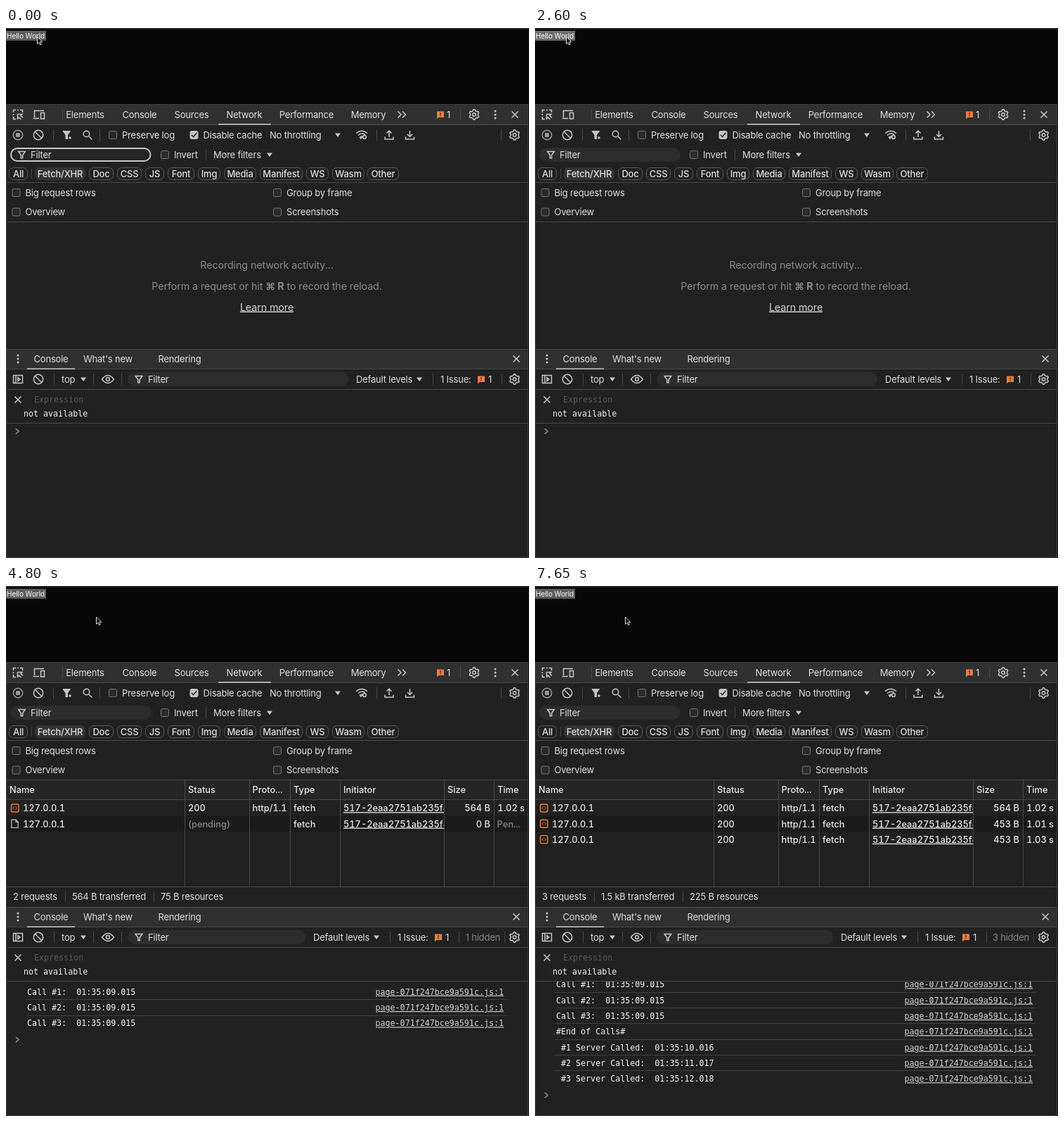
Animation, 744 px wide and 753 px high, one loop 7.7 s. Source, as an HTML page:

```html
<!DOCTYPE html>
<html lang="en">
<head>
<meta charset="utf-8">
<title>Network panel</title>
<style>
html, body { margin: 0; width: 100%; height: 100%; overflow: hidden; background: #212121; }
svg { display: block; }
text { font: 13px Inter, "Open Sans", sans-serif; letter-spacing: -.2px; fill: #dedede; white-space: pre; }
text.mono { font: 11.66px "DejaVu Sans Mono", monospace; letter-spacing: 0; fill: #f2f2f2; }
text.big { font-size: 14.3px; letter-spacing: -.1px; fill: #8b8b8b; }
text.bright { fill: #d6d6d6; }
text.pill { font-weight: 500; }
text.cell { font-size: 12.8px; font-weight: 450; letter-spacing: 0; font-feature-settings: "tnum"; fill: #e6e6e6; }
text.page { font-size: 10px; letter-spacing: -.05px; fill: #fff; }
.link { text-decoration: underline 1px; text-underline-offset: 2px; }
text.mono.link { fill: #cfcfcf; }
text.dim { fill: #858585; }
text.faint { fill: #5a5a5a; }
.icon { fill: none; stroke: #c8c8c8; stroke-width: 1.5; }
.solid { fill: #c8c8c8; stroke: none; }
</style>
</head>
<body>
<svg id="stage" width="744" height="753" viewBox="0 0 744 753"></svg>
<script>
const LOOP = 7700;
const RULE = '#484848';

// Text is placed by the middle of its capitals.
const text = (x, y, s, cls = '', anchor = 'start') => {
  const drop = cls.includes('page') ? 3.6 : cls.includes('mono') ? 4.2 : cls.includes('big') ? 5.1 : 4.7;
  return `<text x="${x}" y="${y + drop}" class="${cls}" text-anchor="${anchor}">${s}</text>`;
};
const rect = (x, y, w, h, fill, r = 0, extra = '') =>
  `<rect x="${x}" y="${y}" width="${w}" height="${h}" rx="${r}" fill="${fill}" ${extra}/>`;
const hline = (y, x = 0, w = 743, c = RULE) => rect(x, y, w, 1, c);
const vline = (x, y, h = 16, c = RULE) => rect(x, y - h / 2, 1, h, c);
const icon = (x, y, d, extra = '') => `<path class="icon" transform="translate(${x} ${y})" d="${d}" ${extra}/>`;
const circle = (x, y, r, extra = '') => `<circle class="icon" cx="${x}" cy="${y}" r="${r}" ${extra}/>`;

const cross = (x, y) => icon(x, y, 'M-4.5-4.5L4.5 4.5M4.5-4.5L-4.5 4.5');
const caretDown = (x, y) => `<path class="solid" d="M${x - 4} ${y - 2.5}h8l-4 5.5z"/>`;
const funnel = (x, y) => icon(x, y, 'M-4.8-4.5H4.8L1.2 .5V4.8H-1.2V.5Z', 'stroke-width="1.2"');
const clear = (x, y) => circle(x, y, 6.7) + icon(x, y, 'M-4.7-4.7L4.7 4.7');
const gear = (x, y) => {
  // Six teeth: two outer points, then two inner ones.
  const points = Array.from({ length: 24 }, (_, i) => {
    const r = i % 4 < 2 ? 7.2 : 5.5, a = (i - .5) * Math.PI / 12 - Math.PI / 2;
    return `${(x + r * Math.cos(a)).toFixed(2)},${(y + r * Math.sin(a)).toFixed(2)}`;
  });
  return `<polygon class="icon" points="${points.join(' ')}" stroke-linejoin="round"/>` + circle(x, y, 2.3);
};
const dots = (x, y) => [-5, 0, 5].map(d => circle(x, y + d, 1.5, 'style="fill:#c8c8c8;stroke:none"')).join('');
const issue = (x, y) => `<path fill="#ee7c45" d="M${x} ${y - 4.5}h10v8.5h-7.5l-2.5 2.5z"/>` +
  rect(x + 4.4, y - 3, 1.3, 3.6, '#3a2a20') + rect(x + 4.4, y + 1.4, 1.3, 1.3, '#3a2a20');
const box = (x, y, on) => rect(x - 5.5, y - 5.5, 11, 11, on ? '#c4c4c4' : '#2b2b2b', 2, `stroke="${on ? '#c4c4c4' : '#777'}"`) +
  (on ? icon(x, y, 'M-3.5 0L-1 2.7L3.7-3', 'style="stroke:#222"') : '');
const check = (x, y, label, on) => box(x, y, on) + text(x + 13, y, label);

function pageAndTabs() {
  return rect(0, 0, 744, 108, '#080808') + rect(0, 0, 744, 1.5, '#303030') +
    rect(0, 108, 744, 29, '#303030') + hline(108, 0, 743, '#3d3d3d') + hline(137) +
    icon(17, 123, 'M-3 6.5H-6.5V3M-6.5-3V-6.5H-3M3-6.5H6.5V-3M-6.5-1V1M-1-6.5H1M-.5-.5V6L1.5 4L4.5 7M-.5-.5H6L4 1.5L7 4.5') +
    icon(47, 123, 'M-6.5 4V-5.5H7M-8.5 5.5H0M2.5-2.5H7.5V6H2.5Z') +
    vline(80, 123) +
    [['Elements', 112.5], ['Console', 190], ['Sources', 264], ['Network', 339], ['Performance', 427.5], ['Memory', 515.5]]
      .map(([s, x]) => text(x, 123, s, '', 'middle')).join('') +
    rect(302, 136, 75, 1.5, '#c8c8c8') +
    icon(563, 123, 'M-5.5-4.5L-1 0L-5.5 4.5M1-4.5L5.5 0L1 4.5') +
    issue(613, 123) + text(627, 123, '1') + vline(646, 123) + gear(666, 123) + dots(696, 123) + cross(724, 123);
}

function networkTools() {
  return circle(17, 152, 6.7, 'style="stroke:#999"') + rect(14, 149, 6, 6, '#999', 1) + clear(46, 152) + vline(67, 152) +
    icon(87, 152, 'M-6-5.5H4.5L.5 0V5.5H-2V0Z', 'style="fill:#c4c4c4;stroke-width:1"') +
    circle(91, 156, 1.8, 'style="fill:#c4c4c4;stroke:none"') +
    circle(114.5, 150.5, 4.3) + icon(118, 154, 'M0 0L4.5 4.5') + vline(133, 152) +
    check(152, 152, 'Preserve log') + check(267.5, 152, 'Disable cache', true) +
    text(375, 152, 'No throttling') + caretDown(472, 152) +
    icon(506, 152, 'M-8-2.5Q0-9 8-2.5M-5 .5Q0-3.8 5-.5M-2.5 3.5Q-1 1.5 1 2L-1 5Z') + circle(510, 155, 2.4) +
    vline(527, 152) +
    icon(545, 152, 'M0 3V-5.5M-3.5-2.5L0-6L3.5-2.5M-6 2.5V6H6V2.5') +
    icon(574.5, 152, 'M0-6V2.5M-3.5-1L0 2.5L3.5-1M-6 2.5V6H6V2.5') +
    vline(704, 152) + gear(723.5, 152) +
    check(226, 180, 'Invert') + vline(284, 180) + text(295, 180, 'More filters') + caretDown(375, 180);
}

function filterPills() {
  const pills = [['All', 4, 27], ['Fetch/XHR', 41, 72], ['Doc', 118, 35], ['CSS', 158, 35], ['JS', 198, 27],
    ['Font', 230, 38], ['Img', 273, 32], ['Media', 310, 46], ['Manifest', 361, 61], ['WS', 427, 32],
    ['Wasm', 464, 46], ['Other', 514, 45]];
  return pills.map(([s, x, w]) => {
    const active = s === 'Fetch/XHR';
    return rect(x + .5, 198.5, w - 1, 17, active ? '#343434' : 'none', 6, `stroke="${active ? '#343434' : '#5c5c5c'}"`) +
      text(x + w / 2, 207, s, 'pill', 'middle');
  }).join('') + vline(36, 207, 14) + hline(219) +
    check(14.5, 234, 'Big request rows') + check(386, 234, 'Group by frame') +
    check(14.5, 261.5, 'Overview') + check(386, 261.5, 'Screenshots') + hline(275);
}

function drawer() {
  return rect(0, 457, 744, 28, '#303030') + hline(456) + hline(484) + dots(17, 470) +
    text(64, 470, 'Console', '', 'middle') + rect(30, 483.5, 68, 1.5, '#c8c8c8') +
    text(145, 470, "What's new", '', 'middle') + text(247, 470, 'Rendering', '', 'middle') + cross(726, 470) +
    icon(17, 499, 'M-6.5-5.5H6.5V5.5H-6.5ZM-3-5.5V5.5M0-2.5L3 0L0 2.5Z') + clear(46, 499) + vline(68, 499) +
    text(79, 499, 'top') + caretDown(110, 499) + vline(124, 499) +
    icon(145, 499, 'M-8.5 0Q0-11 8.5 0Q0 11-8.5 0Z') + circle(145, 499, 2.4) + vline(164, 499) +
    gear(723.5, 499) + hline(513) +
    cross(17, 528) + text(40, 528, 'Expression', 'mono faint') + text(25, 548, 'not available', 'mono') + hline(561);
}

function filterBox(focused, caret) {
  return (focused ? rect(7, 171, 198.5, 18, '#252525', 9, 'stroke="#c9c9c9" stroke-width="2"')
                  : rect(6, 170, 201, 20, '#2d2d2d', 10)) +
    funnel(22.5, 180) + text(35, 180, 'Filter') + (caret ? rect(35, 172.5, 1.2, 14, '#eee') : '');
}

const emptyPanel = () =>
  text(371, 337, 'Recording network activity...', 'big', 'middle') +
  text(371, 366.5, 'Perform a request or hit <tspan font-weight="700">⌘ R</tspan> to record the reload.', 'big', 'middle') +
  text(371, 396.5, 'Learn more', 'big bright link', 'middle');

// step n: n-1 requests are done and the next one is pending; step 4: all done.
function requestTable(step) {
  const count = Math.min(step, 3);
  let out = rect(0, 276, 743, 27, '#262626');
  [['Name', 5], ['Status', 259], ['Proto...', 350.5], ['Type', 409], ['Initiator', 480], ['Size', 628], ['Time', 699]]
    .forEach(([s, x]) => out += text(x, 289.5, s, 'cell'));
  out += hline(303);
  for (let i = 0; i < count; i++) {
    const y = 315.5 + i * 22.3, done = i < step - 1;
    if (i === 1) out += rect(0, y - 11, 743, 22.3, '#1b1b1b');
    out += done
      ? rect(7.5, y - 5.5, 10.5, 11, 'none', 2, 'stroke="#ee7c45" stroke-width="1.4"') +
        icon(12.7, y, 'M-1-2L-3 0L-1 2M1-2L3 0L1 2', 'style="stroke:#ee7c45;stroke-width:1"')
      : icon(12.5, y, 'M-4.7-5.7H1.5L4.7-2.5V5.7H-4.7ZM1.5-5.7V-2.5H4.7', 'style="stroke-width:1.2"');
    out += text(24, y, '127.0.0.1', 'cell') + text(259, y, done ? '200' : '(pending)', done ? 'cell' : 'cell dim') +
      (done ? text(350.5, y, 'http/1.1', 'cell') : '') + text(409, y, 'fetch', 'cell') +
      `<g clip-path="url(#initiator)">${text(480, y, '517-2eaa2751ab235f48', 'cell link')}</g>` +
      text(689, y, done ? (i ? '453 B' : '564 B') : '0 B', 'cell', 'end') +
      (done ? text(738, y, ['1.02 s', '1.01 s', '1.03 s'][i], 'cell', 'end') : text(698.5, y, 'Pen...', 'cell dim'));
  }
  [254, 346, 404, 475, 623, 694].forEach(x => out += rect(x, 276, 1, 151, RULE));
  const sent = ['0 B', '564 B', '1.0 kB', '1.5 kB'][step - 1];
  const stops = step === 1 ? [92, 202.5] : [94, 220];
  return out + hline(427) + text(10, 441.5, count + ' requests') +
    text(stops[0], 441.5, sent + ' transferred') + text(stops[1], 441.5, (step - 1) * 75 + ' B resources') +
    stops.map(x => vline(x - 10, 441.5, 14)).join('');
}

function consoleTools(hidden) {
  const shift = [0, 61, 63, 63][hidden];
  return rect(173, 489, 314 - shift, 20, '#2d2d2d', 10) + funnel(189, 499) + text(202, 499, 'Filter') +
    `<g transform="translate(${-shift} 0)">` + text(498, 499, 'Default levels') + caretDown(588, 499) + vline(607, 499) +
    text(618, 499, '1 Issue:') + issue(671, 499) + text(686, 499, '1') + vline(705, 499) + '</g>' +
    (hidden ? text(703, 499, hidden + ' hidden', 'dim', 'end') + vline(709, 499) : '');
}

const LOGS = [
  ...[1, 2, 3].map(n => `Call #${n}:  01:35:09.015`), '#End of Calls#',
  ...[1, 2, 3].map(n => ` #${n} Server Called:  01:35:1${n - 1}.01${n + 5}`)
];

function consoleLog(count) {
  const top = count > 3 ? 566 : 576.5, pitch = 22.35;
  let out = '';
  for (let i = 0; i < count; i++) {
    const y = top + i * pitch;
    out += text(30, y, LOGS[i], 'mono') + text(708, y, 'page-071f247bce9a591c.js:1', 'mono link', 'end');
    if (i < count - 1) out += hline(Math.round(y + 10.7), 28, 684, '#414141');
  }
  const promptY = count ? top + count * pitch + 1 : 573;
  return `<g clip-path="url(#log)">${out}</g>` +
    icon(16, promptY, 'M-2.2-3.8L2.2 0L-2.2 3.8', 'style="stroke:#999;stroke-width:1.3"');
}

const stage = document.getElementById('stage');
stage.innerHTML =
  `<defs><clipPath id="initiator"><rect x="476" y="276" width="147" height="151"/></clipPath>
   <clipPath id="log"><rect y="562" width="744" height="191"/></clipPath></defs>` +
  rect(0, 0, 744, 753, '#212121') + pageAndTabs() + networkTools() + filterPills() + drawer() +
  '<g id="live"></g>' + rect(0, 108, 1, 645, '#3a3a3a') + rect(742, 108, 1, 645, '#3a3a3a') +
  rect(743, 0, 1, 753, '#111') + hline(752, 0, 744, '#3a3a3a') +
  rect(736, 574, 5.5, 178, '#8a8a8a', 2.7, 'id="scrollbar"') +
  '<path id="cursor" d="M0 0V10.2L2.4 8L4 11.5L5.7 10.7L4.2 7.3H7.3Z" fill="#000" stroke="#e8e8e8" stroke-width="1"/>';
const [live, cursor, scrollbar] = ['live', 'cursor', 'scrollbar'].map(id => document.getElementById(id));

const passed = (t, times) => times.filter(x => t >= x).length;
const progress = (t, from, to) => Math.min(1, Math.max(0, (t - from) / (to - from)));
const start = performance.now();
let shown = '';

function draw() {
  const t = (performance.now() - start) % LOOP;
  const step = passed(t, [3095, 4100, 5095, 6095]);
  const logs = [0, 1, 3, 7][passed(t, [3045, 3095, 6095])];
  const focused = t < 2300;
  const caret = focused && passed(t, [150, 650, 1150, 1650, 2150]) % 2 === 1;
  const pressed = t >= 2300 && t < 3600;
  const key = [step, logs, focused, caret, pressed].join();
  if (key !== shown) {
    shown = key;
    live.innerHTML = rect(0, 4, 57, 14, pressed ? '#6e6e6e' : '#5d5d5d') + text(1, 11, 'Hello World', 'page') +
      filterBox(focused, caret) + (step ? requestTable(step) : emptyPanel()) +
      consoleTools(Math.max(0, step - 1)) + consoleLog(logs);
  }
  scrollbar.setAttribute('opacity', t < 6095 ? 0 : 1 - progress(t, 6650, 6800));
  const p = progress(t, 3530, 3930), ease = p * p * (3 - 2 * p);
  cursor.setAttribute('transform', `translate(${44.5 + 84 * ease} ${12.5 + 31.5 * ease})`);
  requestAnimationFrame(draw);
}
draw();
</script>
</body>
</html>
```
